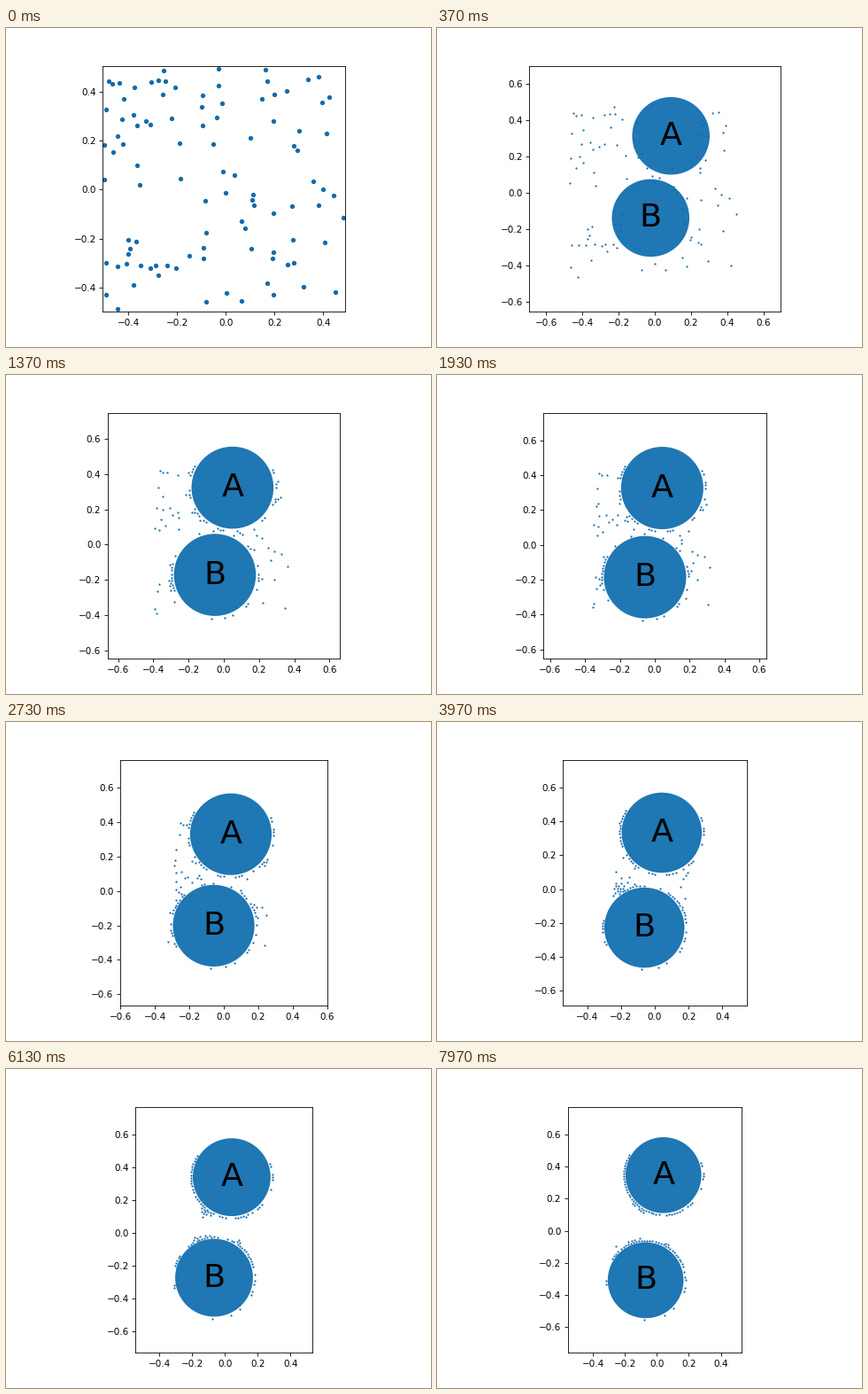
A matplotlib script that plays this animation: 480x360 px, repeating every 8000 ms.

```python
import numpy as np
import matplotlib.pyplot as plt
from matplotlib.animation import FuncAnimation

FPS, FRAMES, COUNT = 30, 240, 100
BLUE, DOT = "#1f77b4", "#146aa9"
SPEED = 0.087   # pull of a dot towards its disc, per second
RING = 0.2485   # distance at which dots rest round a disc
GAP = 0.0175    # closest distance between dots
EXIT = 1.1      # seconds a covered dot needs to reach the rim


def drift(t, base, rate, kick):
    """Steady drift plus a kick that dies out in the first two seconds."""
    return base + rate * t + kick * np.exp(-t * t)


def disc_state(t):
    a = drift(t, 0.041, 0, 0.055), drift(t, 0.320, 0.0035, -0.008)
    b = drift(t, -0.053, -0.0022, 0.035), drift(t, -0.1465, -0.0204, 0.017)
    return np.array([a, b]), drift(t, 0.237, 0, -0.026)


def view(t):
    """Limits of the axes; the box narrows fast, then settles."""
    if t == 0:
        return (-0.506, 0.489), (-0.501, 0.506)
    low = drift(t, -0.618, -0.0182, -0.038)
    high = drift(t, 0.752, 0.0025, -0.062)
    left = min(100 + 10.7 * t, 148.6 - 5.8 * np.exp((4 - t) / 2.2))
    half = (246 - left) * (high - low) / 277.2
    mid = -0.0033 * max(0, t - 4)
    return (mid - half, mid + half), (low, high)


def unit(v):
    return v / np.maximum(np.linalg.norm(v, axis=-1, keepdims=True), 1e-9)


def spread(p):
    """Push apart dots that are closer than GAP."""
    diff = p[:, None] - p[None]
    dist = np.linalg.norm(diff, axis=2)
    push = np.clip(GAP - dist, 0, None) * (dist > 0)
    return p + 0.35 * (unit(diff) * push[..., None]).sum(axis=1)


def keep_out(p, centers):
    for c in centers:
        out = p - c
        inside = np.linalg.norm(out, axis=1) < RING
        p[inside] = c + RING * unit(out[inside])
    return p


def simulate():
    rng = np.random.default_rng(12)
    start = rng.uniform(-0.5, 0.5, (COUNT, 2))
    goal = rng.integers(0, 2, COUNT)
    goal[start[:, 1] > 0.4] = 0
    goal[(start[:, 1] < -0.35) & (abs(start[:, 0]) < 0.4)] = 1

    # dots under a disc leave it on the side facing the other disc
    centers, _ = disc_state(0)
    dist = np.linalg.norm(start[:, None] - centers, axis=2)
    home = dist.argmin(axis=1)
    deep = dist.min(axis=1) < 0.225
    rel = start - centers[home]
    axis = np.where(home == 0, -np.pi / 2, np.pi / 2)
    turn = np.arctan2(rel[:, 1], rel[:, 0]) - axis
    angle = axis + 0.6 * ((turn + np.pi) % (2 * np.pi) - np.pi)
    rim = RING * np.column_stack([np.cos(angle), np.sin(angle)])

    p, path = start.copy(), [start]
    for i in range(1, FRAMES):
        t = i / FPS
        centers, _ = disc_state(t)
        aim = unit(centers[goal] - p)
        p = p + aim * SPEED / FPS
        # slide round the disc that is in the way
        out = p - centers[1 - goal]
        block = np.linalg.norm(out, axis=1) < RING + 0.004
        n = unit(out)
        side = unit(aim - (aim * n).sum(axis=1, keepdims=True) * n)
        p[block] += side[block] * SPEED * 0.6 / FPS
        for _ in range(5):
            p = keep_out(spread(p), centers)
        if t < EXIT:
            s = t / EXIT
            end = centers[home] + rim
            p[deep] = (start + (end - start) * s * (2 - s))[deep]
        path.append(p)
    return path


path = simulate()
fig, ax = plt.subplots(figsize=(6.4, 4.8), dpi=75)
ax.set_aspect("equal", adjustable="box")
discs = [ax.add_patch(plt.Circle((0, 0), 0.2, color=BLUE, lw=0)) for _ in "AB"]
dots = ax.scatter(*path[0].T, color=DOT, linewidths=0, zorder=2)
names = [ax.text(0, 0, s, fontsize=35, ha="center", va="center") for s in "AB"]


def draw(i):
    t = i / FPS
    dots.set_offsets(path[i])
    dots.set_sizes([4.5 if i else 26])
    centers, radius = disc_state(t)
    for disc, name, c in zip(discs, names, centers):
        disc.set(center=c, radius=radius, visible=i > 0)
        name.set(position=c, visible=i > 0)
    xlim, ylim = view(t)
    ax.set(xlim=xlim, ylim=ylim)
    return [dots, *discs, *names]


anim = FuncAnimation(fig, draw, frames=FRAMES, interval=1000 / FPS,
                     repeat=True, repeat_delay=0, blit=False)
plt.show()
```
